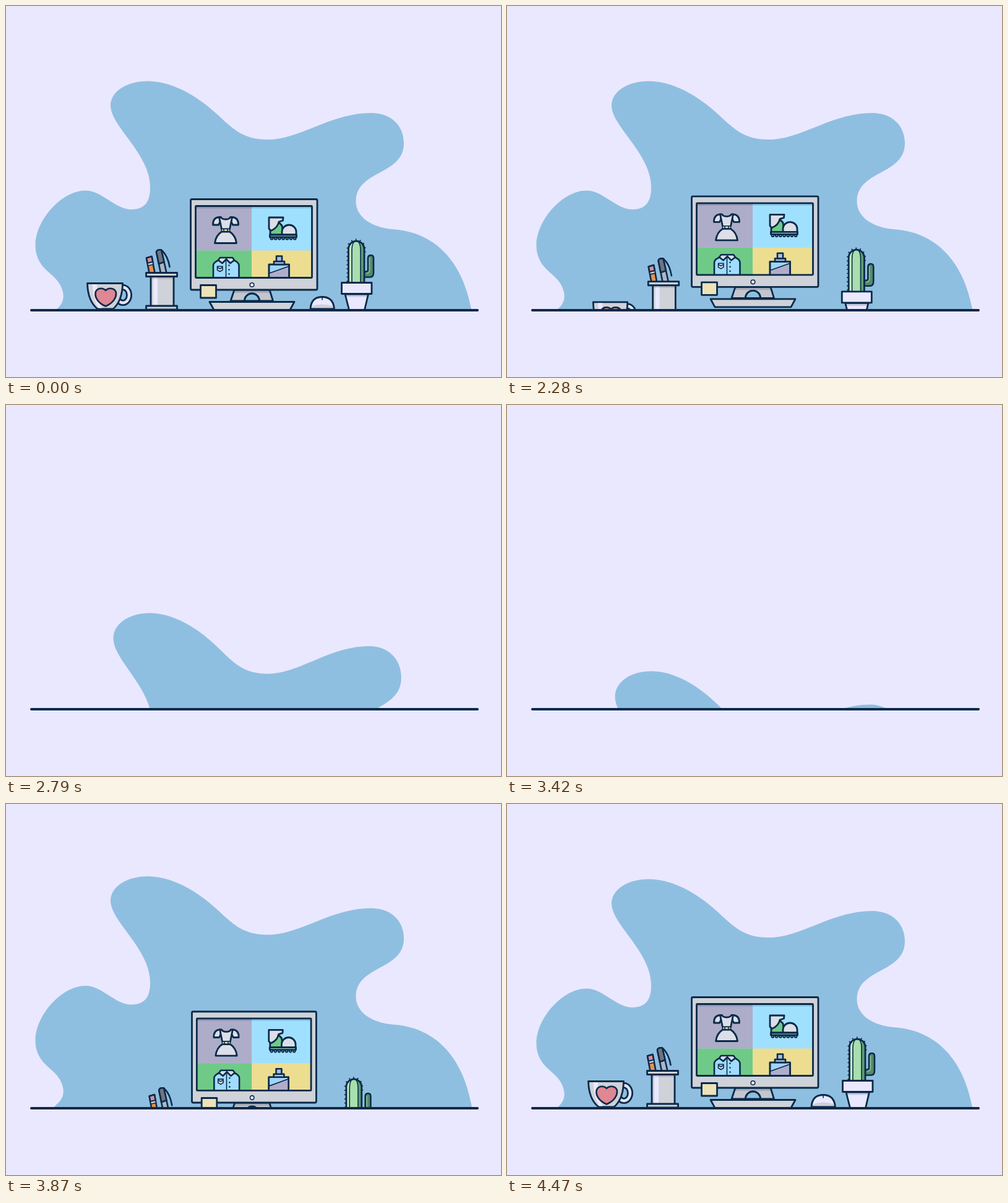
Write an HTML page that moves like this. It is 800 px wide and 600 px high and loops after 4710 ms.

```html
<!DOCTYPE html>
<html lang="en">
<head>
<meta charset="utf-8">
<title>Desk</title>
<style>
  html, body { margin: 0; width: 100%; height: 100%; overflow: hidden; background: #eae8ff; }
  svg { display: block; width: 100%; height: 100%; }
  .ink { stroke: #0a2a4a; stroke-width: 2.8; stroke-linejoin: round; stroke-linecap: round; }
  .thin { stroke-width: 1.6; }
  .mid { stroke-width: 2.6; }
  .none { fill: none; }
  .grey { fill: #cfd2d8; }
  .pale { fill: #dcdfe8; }
  .light { fill: #eae8ff; }
  .shade { fill: #0a2a4a; opacity: .16; }
</style>
</head>
<body>
<svg viewBox="0 0 800 600">
  <defs>
    <clipPath id="above"><rect width="800" height="492"/></clipPath>
    <clipPath id="glass"><rect x="306.5" y="323.5" width="188" height="116"/></clipPath>
  </defs>
  <rect width="800" height="600" fill="#eae8ff"/>

  <g clip-path="url(#above)">
    <g id="blob">
      <path fill="#8fbfe0" d="M70 505Q78 494 82 490C92 482 94 472 92 463C88 444 74 436 64 426C53 415 47 402 47.5 385C49 345 90 299 128 298.5C155 298 176 329 203 329C225 329 233 315 233 294C233 238 169 195 169 161C169 138 195 121.5 229 121.5C265 121.5 305 142 340 174C367 199 383 216 423 216C475 216 525 173 590 173C622 173 643 193 643 222C643 274 565.5 265 565.5 316C565.5 342 592 358 624 361C692 365 737 411 752 490L755 505Z"/>
    </g>

    <g id="screen">
      <path class="ink grey" d="M329 478.5H466L459 491.5H336Z"/>
      <path class="ink" fill="#c3c6cf" d="M369 459H426L431.5 477H409.5A12 12 0 0 0 385.5 477H363Z"/>
      <path class="shade" d="M369 460H426L427 464H368Z"/>
      <path class="ink" fill="#8fbfe0" d="M385.5 477A12 12 0 0 1 409.5 477Z"/>
      <rect class="ink grey" x="298.5" y="312.5" width="204.5" height="146.5" rx="2"/>
      <g clip-path="url(#glass)">
        <path fill="#adadc9" d="M306 323H397V395.5H306Z"/>
        <path fill="#a0e0ff" d="M397 323H495V395.5H397Z"/>
        <path fill="#6fca87" d="M306 395.5H397V440H306Z"/>
        <path fill="#ecdd90" d="M397 395.5H495V440H397Z"/>
        <path class="shade" d="M306 324H495V327.5H306Z"/>

        <g class="ink pale">
          <path d="M345 341.5Q334 342 334.5 354H343.5L346 349Z"/>
          <path d="M365 341.5Q376 342 375.5 354H366.5L364 349Z"/>
          <path d="M344.5 341.5H347.5Q349 345 355 345Q361 345 362.5 341.5H365.5L361.5 361H348.5Z"/>
          <path d="M348.5 365H361.5Q371 371 372.5 383.5H337.5Q339 371 348.5 365Z"/>
          <path class="thin" fill="#ece0a8" d="M348.5 360.5H361.5V364.5H348.5ZM352 360.5V364.5M358 360.5V364.5"/>
        </g>

        <g class="ink">
          <path fill="#6fca87" d="M427 362Q437 360 440 349L446 355L448 370H427Z"/>
          <path class="pale" d="M425 342H448L447.5 347L441 349Q439 359 428 363.5L425 360Z"/>
          <path class="pale" d="M446 370V364A11.6 11.5 0 0 1 469 364V370Z"/>
          <path fill="#8fcbb5" d="M426.5 370H469.5V374H426.5Z"/>
          <path class="none" stroke-dasharray="0 6.2" style="stroke-width:5.6" d="M429.5 376H468"/>
          <path class="none" stroke-dasharray="0 6.2" style="stroke-width:1.6;stroke:#cfd2da" d="M429.5 376H468"/>
          <path class="none thin" stroke-dasharray="0 3.5" d="M442 352L447 357"/>
        </g>

        <g class="ink mid">
          <path fill="#a0dcff" d="M335 442V419Q335.5 414 346 410H366Q376 414 376.5 419V442Z"/>
          <path class="none thin" d="M355.5 412V440"/>
          <path class="pale" d="M346 407H366L369 411L362.5 416L356 409.5L349.5 416L343 411Z"/>
          <path class="thin pale" d="M341.5 421H350V427L345.7 429.5L341.5 427ZM341.5 422.5L345.7 425L350 422.5"/>
          <path class="none" stroke-dasharray="0 7" d="M360.5 419.5V434"/>
        </g>

        <g class="ink mid">
          <path fill="#a0d4f5" d="M425 418H457.5V442H425Z"/>
          <path fill="#b0adcb" stroke="none" d="M426.2 432L456.2 421V442H426.2Z"/>
          <path class="none thin" d="M426 432L457 421"/>
          <path class="none" d="M425 442V418H457.5V442"/>
          <path fill="#a9bfe0" d="M433 413H450V418H433Z"/>
          <path fill="#a9bfe0" d="M437 404.5H446V413H437Z"/>
        </g>
      </g>
      <rect class="ink none" x="306.5" y="323.5" width="188" height="116" rx="1"/>
      <circle class="ink thin light" cx="397.5" cy="451" r="3.3"/>
      <rect class="ink" fill="#ede2b8" x="314.5" y="451.5" width="25" height="20.5"/>
    </g>

    <g id="tall">
      <g class="ink mid">
        <path fill="#e8914a" d="M227 407.5L235.5 405L240.5 432H231.5Z"/>
        <path fill="#e08c96" d="M227 407.5L235.5 405L237.2 414L228.7 416Z"/>
        <path class="grey thin" d="M228.7 416L237.2 414L238 418L229.5 420Z"/>
        <path class="none" d="M252 395.5Q261.5 404 264.5 422"/>
        <path fill="#b0b5c2" d="M243 398Q243.5 393.5 251 394.5L259.5 432H250Z"/>
        <path fill="#72747f" d="M243 398Q243.5 393.5 251 394.5L255.5 414L247 417Z"/>
      </g>
      <path class="ink grey" d="M234 437H271V486H234Z"/>
      <path class="light" d="M238 439H245V484H238Z"/>
      <path class="shade" d="M235.5 438.5H269.5V441.5H235.5Z"/>
      <path class="ink grey" d="M226.5 431.5H276.5V437.5H226.5ZM226.5 485H276.5V491H226.5Z"/>

      <path class="ink mid" fill="#558a6a" d="M577 438.5H588Q594 438.5 594 431V408Q594 403 589.5 403Q585 403 585 408V427Q585 430 577 430Z"/>
      <path class="none" stroke="#7fb88d" stroke-width="2" d="M587.5 407V428Q587 432 582 432.5"/>
      <path class="ink none" stroke-dasharray="1.7 5" style="stroke-width:4;stroke-linecap:butt" d="M552.5 446V393A13.5 14.5 0 0 1 579.5 393V402"/>
      <path fill="#a8dfae" d="M553.5 447V392A12.8 13 0 0 1 579 392V447Z"/>
      <path fill="#c3ebc3" d="M554 447V391Q555 383 561 380Q558 386 558.5 447Z"/>
      <path fill="#5f9c73" d="M573 447V392Q572 384 567 379.5Q579 380 579 393V447Z"/>
      <path class="ink thin none" d="M559 446V394Q559 384 564 380M573 446V394Q573 384 568 380"/>
      <path class="ink none" d="M553.5 447V392A12.8 13 0 0 1 579 392V447"/>
      <path class="ink light" d="M548 466H585.5L579.5 491.5H554.5Z"/>
      <path class="shade" d="M549 467H584.5L583.5 470.5H550Z"/>
      <rect class="ink light" x="542.5" y="447.5" width="48.5" height="18"/>
    </g>

    <g id="small">
      <ellipse class="none" cx="189" cy="467.5" rx="10" ry="12.5" stroke="#0a2a4a" stroke-width="10"/>
      <ellipse class="none" cx="189" cy="467.5" rx="10" ry="12.5" stroke="#e4e3f5" stroke-width="4.4"/>
      <path class="ink grey" d="M131.5 448.5H188.5Q188 477 173 490H148Q132 477 131.5 448.5Z"/>
      <path class="light" d="M139.5 450H147Q147 476 155 488.5H149.5Q140 474 139.5 450Z"/>
      <path class="ink mid" fill="#df8793" d="M161 485.5C148 480 144 471 144.5 465C145 456 156 454.5 161 460C166 454.5 177.5 456 178 465C178 471 174 480 161 485.5Z"/>
      <path class="light" d="M492 490Q493 470.5 511 470.5Q529 470.5 530.5 490Z"/>
      <path fill="#cfcfd9" d="M493 486Q511 479 530 486V490H493Z"/>
      <path class="ink none" d="M492 490Q493 470.5 511 470.5Q529 470.5 530.5 490Z"/>
      <path class="ink thin none" d="M511 471V475"/>
    </g>
  </g>

  <path class="ink none" style="stroke-width:4" d="M41 492H762"/>
</svg>

<script>
  const LOOP = 4710, STEP = 30, HIDDEN = 3150, LIFT = 90, SETTLE = 95, CENTRE = 412;

  // top, depth: resting top edge and distance to sink; kx, ky: squeeze and stretch
  // out, back: [time of the highest point, travel time, overshoot]
  const parts = [
    { id: 'blob',   top: 121.5, depth: 371, kx: .026, ky: .055, out: [2403, 504, 9], back: [3923, 550, 8] },
    { id: 'screen', top: 311,   depth: 181, kx: .066, ky: .02,  out: [2259, 505, 5], back: [4076, 550, 2.5] },
    { id: 'tall',   top: 377,   depth: 116, kx: .037, ky: .02,  out: [2102, 450, 5], back: [4232, 480, 3] },
    { id: 'small',  top: 446,   depth: 47,  kx: .037, ky: .02,  out: [1950, 400, 5], back: [4375, 330, 3] }
  ];
  for (const p of parts) p.node = document.getElementById(p.id);

  const clamp = x => Math.min(1, Math.max(0, x));
  const smooth = x => x * x * (3 - 2 * x);

  // Sinks or rises on a parabola whose vertex is the overshoot point.
  function offset(p, t) {
    const leaving = t < HIDDEN;
    const [peak, span, over] = leaving ? p.out : p.back;
    const gap = leaving ? t - peak : peak - t;
    if (gap >= 0) return -over + (p.depth + over) * clamp(gap / span) ** 2;
    if (leaving) return -over * (1 - clamp(-gap / LIFT) ** 2);
    return -over * (1 - smooth(clamp(-gap / SETTLE)));
  }

  function draw(t) {
    for (const p of parts) {
      const y = offset(p, t);
      const f = clamp(y / p.depth) ** .65;
      p.node.setAttribute('transform',
        `translate(${CENTRE} ${p.top + y}) scale(${1 - p.kx * f} ${1 + p.ky * f}) translate(${-CENTRE} ${-p.top})`);
    }
  }

  const start = performance.now();
  function tick() {
    const t = (performance.now() - start) % LOOP;
    draw(Math.floor((t + .5) / STEP) * STEP);
    requestAnimationFrame(tick);
  }
  tick();
</script>
</body>
</html>
```
